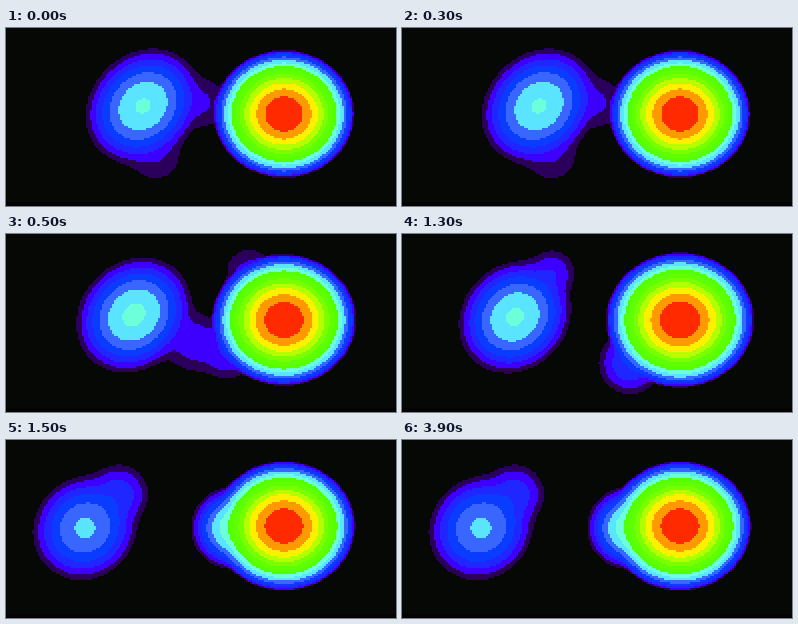
Recreate the animation shown at these times as a matplotlib script. Size 390 px wide and 178 px high, loop 5.5 s.

```python
import numpy as np
import matplotlib.pyplot as plt
from matplotlib.animation import FuncAnimation

WIDTH, HEIGHT, DPI = 390, 178, 100
CELL = 2
STEP_MS, STEPS = 500, 11

# One colour per whole step of log brightness, from empty to hottest.
PALETTE = np.array([
    (5, 8, 5), (42, 0, 92), (61, 0, 255), (32, 38, 255), (10, 60, 255),
    (56, 102, 255), (91, 228, 255), (108, 255, 218), (85, 255, 0),
    (95, 255, 0), (120, 255, 0), (180, 255, 0), (255, 240, 0),
    (255, 153, 0), (255, 42, 0),
], dtype=np.uint8)
FLOOR = (4, 2, 2)

HOT_CENTRE = (278, 86)
HOT_PEAK, HOT_FALL, HOT_ASPECT = 14.9, 12.3, 0.91

# cool: x, y, peak, radius along the rising diagonal, radius across it
# hot: rim radius
# lobes: faint bumps as x, y, peak, radius
POSES = [
    dict(cool=(137, 78, 7.1, 62, 52), hot=70,
         lobes=[(150, 128, 1.9, 22), (197, 75, 2.1, 22)]),
    dict(cool=(128, 81, 7.25, 62, 53), hot=72,
         lobes=[(188, 108, 2.6, 28), (243, 38, 2.3, 22), (222, 118, 3, 26)]),
    dict(cool=(113, 83, 7.15, 60, 52), hot=74,
         lobes=[(150, 39, 2.9, 22), (228, 129, 4, 31)]),
    dict(cool=(79, 88, 6.2, 54, 50), hot=71,
         lobes=[(113, 54, 3.6, 29), (226, 88, 7.5, 41)]),
]

X, Y = np.meshgrid(np.arange(CELL / 2, WIDTH, CELL),
                   np.arange(CELL / 2, HEIGHT, CELL))


def lobe(x, y, peak, along, across=None):
    """Log of a Gaussian that falls to level 1 at the given radii."""
    dx, dy = X - x, Y - y
    u = (dx - dy) / np.sqrt(2) / along
    v = (dx + dy) / np.sqrt(2) / (across or along)
    return peak - (peak - 1) * (u**2 + v**2)


def hot_disc(radius):
    """Gaussian core whose rim drops away sharply."""
    x, y = HOT_CENTRE
    u = ((X - x) / radius)**2 + ((Y - y) / (radius * HOT_ASPECT))**2
    fall = HOT_FALL * u
    return HOT_PEAK - fall - (fall / 12)**16


def draw_pose(cool, hot, lobes):
    sources = [lobe(*cool), hot_disc(hot), *(lobe(*bump) for bump in lobes)]
    brightness = np.logaddexp.reduce(sources)
    levels = np.clip(np.floor(brightness), 0, len(PALETTE) - 1).astype(int)
    pixels = PALETTE[levels]
    pixels[Y > 173] = FLOOR
    return pixels


pictures = [draw_pose(**pose) for pose in POSES]

fig = plt.figure(figsize=(WIDTH / DPI, HEIGHT / DPI), dpi=DPI,
                 facecolor="black")
ax = fig.add_axes((0, 0, 1, 1))
ax.axis("off")
image = ax.imshow(pictures[0], interpolation="nearest", aspect="auto",
                  extent=(0, WIDTH, HEIGHT, 0))


def update(step):
    image.set_data(pictures[min(step, len(pictures) - 1)])
    return (image,)


animation = FuncAnimation(fig, update, frames=STEPS, interval=STEP_MS,
                          repeat=True, repeat_delay=0, blit=False)
plt.show()
```
